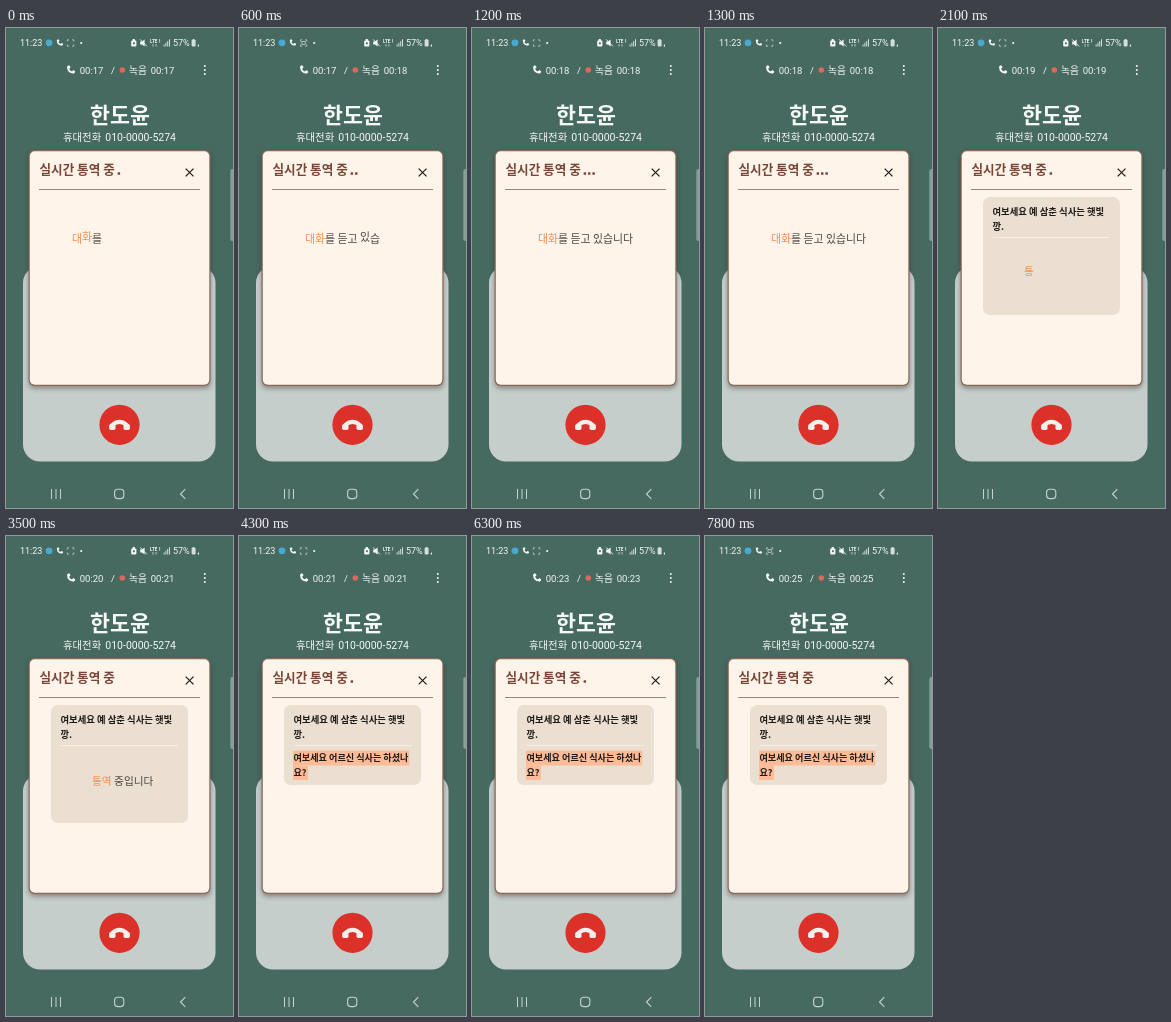
These frames come from a looping animation (227 by 480 pixels, 8000 ms). An HTML page with a canvas:

```html
<!DOCTYPE html>
<html lang="ko">
<head>
<meta charset="utf-8">
<title>통화 통역</title>
<style>
  html, body { margin: 0; width: 100%; height: 100%; overflow: hidden; background: #476a60; }
  canvas { display: block; width: 100vw; height: 100vh; }
</style>
</head>
<body>
<canvas id="stage"></canvas>
<script>
const W = 227, H = 480, LOOP = 8000;
const PANEL_AT = 1800, RESULT_AT = 3700;
const KO = '"Noto Sans CJK KR", "Noto Sans CJK", sans-serif';
const LATIN = 'Roboto, "Noto Sans CJK KR", sans-serif';
const WHITE = '#f4f8f6', BROWN = '#784639', ORANGE = '#f28c50', INK = '#4a4541';

const canvas = document.getElementById('stage');
const c = canvas.getContext('2d');

function resize() {
  const dpr = window.devicePixelRatio || 1;
  canvas.width = Math.round(innerWidth * dpr);
  canvas.height = Math.round(innerHeight * dpr);
}

// Text is placed by its left edge and vertical centre.
function text(s, x, cy, size, color, weight = 400, family = KO) {
  c.font = `${weight} ${size}px ${family}`;
  c.fillStyle = color;
  c.fillText(s, x, cy + size * 0.37);
}

function box(x, y, w, h, r, fill) {
  c.beginPath();
  c.roundRect(x, y, w, h, r);
  c.fillStyle = fill;
  c.fill();
}

function dot(x, y, r, fill) {
  c.beginPath();
  c.arc(x, y, r, 0, Math.PI * 2);
  c.fillStyle = fill;
  c.fill();
}

function line(points, color, width) {
  c.beginPath();
  points.forEach(([x, y], i) => i ? c.lineTo(x, y) : c.moveTo(x, y));
  c.strokeStyle = color;
  c.lineWidth = width;
  c.stroke();
}

function handset(x, y, scale, angle, color) {
  c.save();
  c.translate(x, y);
  c.rotate(angle);
  c.scale(scale, scale);
  c.beginPath();
  c.moveTo(-8, 0.8);
  c.quadraticCurveTo(0, -6.6, 8, 0.8);
  c.strokeStyle = color;
  c.lineWidth = 4;
  c.stroke();
  box(-10.4, -0.8, 6.4, 6, 1.8, color);
  box(4, -0.8, 6.4, 6, 1.8, color);
  c.restore();
}

function statusBar(t) {
  const soft = '#d3deda';
  text('11:23', 14, 14.8, 9, WHITE, 400, LATIN);
  dot(43, 14.8, 3.4, '#4aa9cf');
  handset(53.4, 15, 0.36, -Math.PI * 0.75, WHITE);

  for (const sx of [-1, 1]) for (const sy of [-1, 1]) {
    const x = 64.6 + sx * 3.2, y = 15 + sy * 3.2;
    line([[x - sx * 1.7, y], [x, y], [x, y - sy * 1.7]], soft, 0.7);
  }
  if (t % 1000 >= 550) {
    c.strokeStyle = soft;
    c.lineWidth = 0.7;
    c.strokeRect(63, 13.6, 3.2, 2.8);
  }
  dot(75.2, 15, 1.1, WHITE);

  // Case, muted speaker, network, signal, battery
  box(125.2, 12.4, 5.2, 6, 1, WHITE);
  box(126.6, 11, 2.4, 2, 0.6, WHITE);
  box(127, 14.2, 1.8, 2, 0.4, '#476a60');
  c.beginPath();
  c.moveTo(134.2, 13.6);
  c.lineTo(136, 13.6);
  c.lineTo(138.6, 11.4);
  c.lineTo(138.6, 18.4);
  c.lineTo(136, 16.4);
  c.lineTo(134.2, 16.4);
  c.fillStyle = WHITE;
  c.fill();
  line([[134.2, 11.4], [141, 18.4]], WHITE, 0.9);
  text('LTE', 144, 13.2, 4.6, WHITE, 700, LATIN);
  line([[153.6, 14.6], [153.6, 11]], soft, 0.8);
  line([[147, 16], [147, 18.6]], soft, 0.8);
  line([[150, 16], [150, 18.6]], soft, 0.8);
  for (let i = 0; i < 4; i++) {
    const h = 2 + i * 1.7;
    box(157.6 + i * 1.8, 18.4 - h, 1, h, 0, soft);
  }
  text('57%', 167, 14.8, 9, WHITE, 400, LATIN);
  box(185.6, 11.8, 4, 6.6, 0.8, soft);
  box(186.7, 11, 1.8, 1.2, 0, soft);
  box(191.8, 16.6, 1.2, 2, 0.4, WHITE);
}

const clock = (t, shift) => '00:' + (17 + Math.floor((t + shift) / 1000));

function callInfo(t) {
  handset(64.4, 42.2, 0.47, -Math.PI * 0.75, WHITE);
  text(clock(t, 350), 73.7, 42, 9.5, WHITE, 400, LATIN);
  text('/', 105, 42, 9.5, WHITE, 400, LATIN);
  dot(116.3, 42, 2.8, '#de665a');
  text('녹음', 123, 42, 9.7, WHITE);
  text(clock(t, 600), 144.7, 42, 9.5, WHITE, 400, LATIN);
  for (const y of [38, 42, 46]) dot(198.8, y, 1, WHITE);

  text('한도윤', 84, 87, 21.7, WHITE, 700);
  text('휴대전화', 57, 109, 10.4, WHITE);
  text('010-0000-5274', 99.3, 109, 10.5, WHITE, 400, LATIN);
}

function callPad() {
  box(17, 238, 192.5, 195.6, 17, '#c6cecc');
  dot(113.5, 396.8, 20.1, '#dc3128');
  handset(113.5, 396.8, 1, 0, '#f6efec');
  box(224.3, 141, 5, 72, 2, '#849f97');
}

function navBar() {
  const color = '#c5d2cd';
  for (const x of [45.5, 50, 54.5]) line([[x, 461], [x, 471]], color, 1);
  c.beginPath();
  c.roundRect(108.6, 461.2, 9.2, 9.4, 3);
  c.strokeStyle = color;
  c.lineWidth = 1.1;
  c.stroke();
  line([[179.3, 461.2], [174.5, 466], [179.3, 470.8]], color, 1.1);
}

function dialog(t) {
  c.save();
  c.shadowColor = 'rgba(40, 25, 15, 0.4)';
  c.shadowBlur = 5;
  c.shadowOffsetY = 2.5;
  box(22.6, 122, 181.9, 236, 6, '#86695a');
  c.restore();
  box(23.8, 123.2, 179.5, 233.6, 5, '#fff4e9');

  text('실시간 통역 중', 33.5, 141.8, 12.6, BROWN, 900);
  const dots = (Math.floor(t / 500) + 1) % 4;
  for (let i = 0; i < dots; i++) box(111.6 + i * 4.4, 144.3, 2.5, 2.5, 0.5, BROWN);

  line([[179.7, 140.6], [187.5, 148.4]], '#1c1815', 1.2);
  line([[187.5, 140.6], [179.7, 148.4]], '#1c1815', 1.2);
  line([[33, 161.5], [194, 161.5]], '#9a877c', 1);
}

// Letters appear one by one, each making a small hop; the first two are accented.
function typed(s, x, cy, size, age) {
  const step = 100, hop = 200;
  [...s].forEach((ch, i) => {
    const a = age - i * step;
    if (a < 0) return;
    const lift = a < hop ? 2 * Math.sin(Math.PI * a / hop) : 0;
    text(ch, x, cy - lift, size, i < 2 ? ORANGE : INK);
    x += c.measureText(ch).width;
  });
}

function transcript(done) {
  const ink = '#1d1916';
  box(45, 169, 137, done ? 80 : 118, 7, '#eadfd1');
  text('여보세요 예 삼춘 식사는 햇빛', 54.5, 183.8, 9.35, ink, 700);
  text('깡.', 54.5, 198.8, 9.35, ink, 700);
  line([[55, 209.5], [172, 209.5]], '#f8eee3', 1);
  if (!done) return;
  box(54, 214.5, 116.2, 15, 0, '#fdbb97');
  box(54, 229.5, 15, 14.5, 0, '#fdbb97');
  text('여보세요 어르신 식사는 하셨나', 54.5, 222, 9.1, ink, 700);
  text('요?', 54.5, 237, 9.1, ink, 700);
}

function draw(now) {
  const t = now % LOOP;
  c.setTransform(canvas.width / W, 0, 0, canvas.height / H, 0, 0);
  c.fillStyle = '#476a60';
  c.fillRect(0, 0, W, H);
  statusBar(t);
  callInfo(t);
  callPad();
  navBar();
  dialog(t);
  if (t < PANEL_AT) {
    typed('대화를 듣고 있습니다', 66, 211, 10.9, t + 210);
  } else {
    transcript(t >= RESULT_AT);
    if (t < RESULT_AT) typed('통역 중입니다', 86, 245.2, 10.7, t - 2030);
  }
}

const start = performance.now();
function tick() {
  draw(performance.now() - start);
  requestAnimationFrame(tick);
}

addEventListener('resize', resize);
resize();
tick();
</script>
</body>
</html>
```
